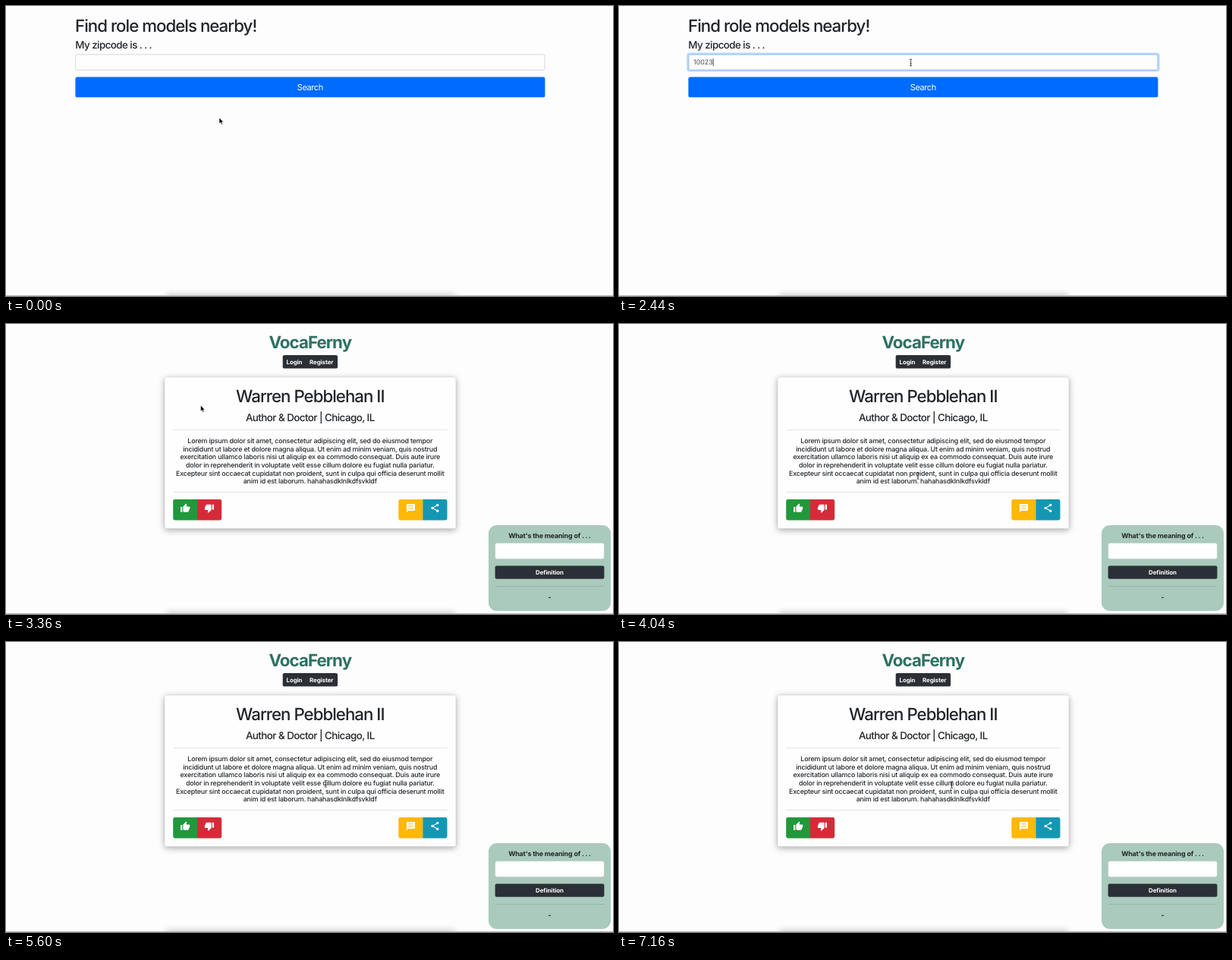
Write an HTML page that moves like this. It is 800x382 px and loops after 7.2 s.

```html
<!DOCTYPE html>
<html lang="en">
<head>
<meta charset="utf-8">
<title>Role model search</title>
<style>
  html, body { margin: 0; width: 100%; height: 100%; overflow: hidden; background: #fdfdfd; }
  #stage { display: block; position: absolute; left: 0; top: 0; }
  text { font-family: Inter, "Open Sans", sans-serif; fill: #212529; text-rendering: geometricPrecision; white-space: pre; }
  .h1 { font-size: 22.3px; font-weight: 500; letter-spacing: -.045em; }
  .h4 { font-size: 13.4px; font-weight: 500; letter-spacing: -.042em; }
  .brand { font-size: 22.3px; font-weight: 700; letter-spacing: -.042em; fill: #2d7062; }
  .go { font-size: 11.1px; letter-spacing: -.04em; fill: #fff; }
  .field { font-size: 8.9px; letter-spacing: -.01em; fill: #495057; }
  .row { font-size: 7.5px; font-weight: 500; fill: #fff; }
  .body { font-size: 8.9px; font-weight: 500; letter-spacing: -.02em; }
  .ask { font-size: 8.9px; font-weight: 700; letter-spacing: -.017em; }
  .small { font-size: 7.9px; font-weight: 700; letter-spacing: -.01em; fill: #fff; }
  .mid { text-anchor: middle; }
  .rule { stroke: #000; stroke-opacity: .1; }
  .dark { fill: #2b3036; }
  .card { filter: drop-shadow(0 2px 4px rgba(0, 0, 0, .34)); }
</style>
</head>
<body>
<svg id="stage" width="800" height="382" viewBox="0 0 800 382">
  <defs>
    <filter id="soft" x="-10%" y="-200%" width="120%" height="500%"><feGaussianBlur stdDeviation="4"/></filter>
    <path id="thumb" d="M1 21h4V9H1v12zm22-11c0-1.1-.9-2-2-2h-6.31l.95-4.57.03-.32c0-.41-.17-.79-.44-1.06L14.17 1 7.59 7.59C7.22 7.95 7 8.45 7 9v10c0 1.1.9 2 2 2h9c.83 0 1.54-.5 1.84-1.22l3.02-7.05c.09-.23.14-.47.14-.73v-2z"/>
  </defs>
  <rect width="800" height="382" fill="#fdfdfd"/>
  <rect x="211" y="380" width="381" height="12" fill="#000" opacity=".22" filter="url(#soft)"/>
  <rect y="381" width="800" height="1" fill="#b9b9b9"/>

  <g id="search">
    <text class="h1" x="91" y="34">Find role models nearby!</text>
    <text class="h4" x="91.3" y="56.2">My zipcode is . . .</text>
    <rect id="ring" x="90.2" y="62.4" width="621.4" height="23.2" rx="3" fill="none" stroke="#007bff" stroke-width="2"/>
    <rect x="91.7" y="63.9" width="618.4" height="20.4" rx="2" fill="#fefefe" stroke="#ced4da" stroke-width=".9"/>
    <rect id="edge" x="91.7" y="63.9" width="618.4" height="20.4" rx="2" fill="none" stroke="#80bdff" stroke-width=".9"/>
    <text class="field" id="typed" x="98.3" y="77.4"></text>
    <rect id="caret" y="69" width=".8" height="10" fill="#222"/>
    <rect id="button" x="91.4" y="93.6" width="619" height="26.7" rx="2.6"/>
    <text class="go mid" x="400.8" y="111">Search</text>
    <svg id="list" x="91.5" y="85" width="107" height="0" overflow="hidden">
      <rect width="107" height="140" fill="#222425"/>
      <g id="rows"></g>
    </svg>
  </g>

  <g id="profile">
    <text class="brand mid" x="400.8" y="31.8">VocaFerny</text>
    <rect class="dark" x="364.7" y="41" width="72.4" height="17.6" rx="2.2"/>
    <text class="small" x="369.5" y="52.8">Login</text>
    <text class="small" x="400" y="52.8">Register</text>

    <rect class="card" x="209" y="70" width="384" height="199.5" rx="2.2" fill="#fefefe"/>
    <rect x="209.2" y="70.2" width="383.6" height="199.1" rx="2.2" fill="none" stroke="#000" stroke-opacity=".13" stroke-width=".6"/>
    <text class="h1 mid" x="400.8" y="103.4">Warren Pebblehan II</text>
    <text class="h4 mid" x="400.8" y="127.7">Author &amp; Doctor | Chicago, IL</text>
    <path class="rule" d="M220 139.5H581.8M220 221.5H581.8"/>
    <g id="story"></g>

    <path fill="#21983c" d="M252 231H222.6a2.4 2.4 0 0 0-2.4 2.4V256a2.4 2.4 0 0 0 2.4 2.4H252z"/>
    <path fill="#d52b39" d="M252 231h29.8a2.4 2.4 0 0 1 2.4 2.4V256a2.4 2.4 0 0 1-2.4 2.4H252z"/>
    <path fill="#ffb806" d="M549.3 231h-29.6a2.4 2.4 0 0 0-2.4 2.4V256a2.4 2.4 0 0 0 2.4 2.4h29.6z"/>
    <path fill="#1497b2" d="M549.3 231h29.8a2.4 2.4 0 0 1 2.4 2.4V256a2.4 2.4 0 0 1-2.4 2.4h-29.8z"/>
    <g fill="#fff">
      <use href="#thumb" transform="translate(229.5 236) scale(.557)"/>
      <use href="#thumb" transform="translate(274.6 249.4) scale(-.557)"/>
      <g transform="translate(526.8 235.9) scale(.557)">
        <path d="M20 2H4c-1.1 0-2 .9-2 2v18l4-4h14c1.1 0 2-.9 2-2V4c0-1.1-.9-2-2-2z"/>
        <path fill="#ffb806" d="M6 5.5h12v1.6H6zM7 9h2v2H7zM11 9h2v2h-2zM15 9h2v2h-2zM6 13h12v1.4H6z"/>
      </g>
      <g transform="translate(558.7 235.7) scale(.557)">
        <path d="M18 5L6 12l12 7" fill="none" stroke="#fff" stroke-width="2"/>
        <circle cx="18" cy="5" r="3"/><circle cx="6" cy="12" r="3"/><circle cx="18" cy="19" r="3"/>
      </g>
    </g>

    <rect x="636" y="265" width="161" height="113" rx="11" fill="#a9cabc"/>
    <text class="ask mid" x="716.5" y="281.8">What's the meaning of . . .</text>
    <rect x="644.8" y="288.7" width="143.4" height="20.6" rx="2.2" fill="#fff" stroke="#ced4da" stroke-width=".5"/>
    <rect class="dark" x="644.6" y="318.4" width="143.8" height="17.4" rx="2"/>
    <text class="small mid" x="716.5" y="330">Definition</text>
    <path class="rule" d="M645 345.5H788"/>
    <text class="ask mid" x="716.5" y="363">-</text>
  </g>

  <g id="pointer">
    <path id="arrow" d="M0 0V8L1.8 6.4 3 9.2 4.4 8.6 3.2 5.9H5.6z" fill="#000" stroke="#fff" stroke-width=".6"/>
    <path id="hand" d="M1.5 4.6V.7Q2.1-.3 2.7.7V3l3 .7q1 .3.9 1.4L6 8.6H2.3L-.2 5.3q0-1 .9-.6z" fill="#fff" stroke="#000" stroke-width=".8" stroke-linejoin="round"/>
    <path id="beam" d="M-1.6-4.5Q0-4.5 0-3.4Q0-4.5 1.6-4.5M0-3.4V3.4M-1.6 4.5Q0 4.5 0 3.4Q0 4.5 1.6 4.5M-1 1.3H1" fill="none" stroke="#222" stroke-width=".8"/>
  </g>
</svg>
<script>
const LOOP = 7200, PAGE = 3280;
const $ = id => document.getElementById(id);

// time, x, y: the pointer eases between these stops
const path = [
  [0, 281, 147], [40, 281, 147], [520, 387, 74], [2400, 387, 74], [2920, 252, 103],
  [PAGE, 252, 104], [4040, 394, 200], [4480, 394, 200], [4760, 394.5, 185],
  [5280, 394.5, 185], [5840, 438.5, 188], [LOOP, 438.5, 188]
];
// time, typed text
const typing = [[0, ""], [1160, "1"], [1520, "10"], [1760, "100"], [1960, "1002"], [2240, "10023"]];
// time, list height, rows
const all = ["11419", "10010", "10023", "10019", "11201", "11375"];
const lists = [
  [0, 0, []], [600, 131, all], [1200, 91, all.slice(0, 4)], [1520, 72.5, all.slice(0, 4)],
  [1560, 71, all.slice(1, 4)], [2000, 31, ["10023"]], [2240, 0, []]
];
const story = [
  "Lorem ipsum dolor sit amet, consectetur adipiscing elit, sed do eiusmod tempor",
  "incididunt ut labore et dolore magna aliqua. Ut enim ad minim veniam, quis nostrud",
  "exercitation ullamco laboris nisi ut aliquip ex ea commodo consequat. Duis aute irure",
  "dolor in reprehenderit in voluptate velit esse cillum dolore eu fugiat nulla pariatur.",
  "Excepteur sint occaecat cupidatat non proident, sunt in culpa qui officia deserunt mollit",
  "anim id est laborum. hahahasdklnlkdfsvkldf"
];

const ramp = (t, from, span = 150) => Math.min(1, Math.max(0, (t - from) / span));
const latest = (steps, t) => steps.filter(s => s[0] <= t).pop();
const show = (id, on) => $(id).setAttribute("visibility", on ? "inherit" : "hidden");
const put = (id, name, value) => $(id).setAttribute(name, value);
const lines = (texts, cls, x, y, step) => texts.map((s, i) =>
  `<text class="${cls}" x="${x}" y="${y + i * step}">${s}</text>`).join("");

function place(t) {
  const i = Math.max(1, path.findIndex(p => p[0] > t));
  const [t0, x0, y0] = path[i - 1], [t1, x1, y1] = path[i];
  const u = (t - t0) / (t1 - t0), e = u * u * (3 - 2 * u);
  return [x0 + (x1 - x0) * e, y0 + (y1 - y0) * e];
}

function drawPointer(t) {
  const [x, y] = place(t), first = t < PAGE;
  const beam = first ? y < 88 : y > 148;
  const hand = first && !beam && y > 93 && y < 120;
  put("pointer", "transform", `translate(${x} ${y})`);
  put("pointer", "visibility", t >= 1160 && t < 1960 ? "hidden" : "visible");
  show("beam", beam);
  show("hand", hand);
  show("arrow", !beam && !hand);
}

let current;
function drawSearch(t) {
  const text = latest(typing, t)[1];
  const focus = ramp(t, 520) * (1 - ramp(t, 3020));
  const hover = Math.max(Math.min(ramp(t, 240), 1 - ramp(t, 355)), ramp(t, 2735));
  put("ring", "opacity", focus * .27);
  put("edge", "opacity", focus);
  put("button", "fill", `rgb(0 ${107 - 17 * hover} ${255 - 47 * hover})`);
  $("typed").textContent = text;
  put("caret", "x", 98.3 + (text ? $("typed").getComputedTextLength() + .2 : 0));
  show("caret", t >= 560 && t < 3020);

  const list = latest(lists, t);
  if (list !== current) {
    current = list;
    put("list", "height", list[1]);
    show("list", list[1] > 0);
    $("rows").innerHTML = lines(list[2], "row", 6.5, 17.6, 20);
  }
}

function draw(t) {
  const first = t < PAGE;
  put("search", "visibility", first ? "visible" : "hidden");
  put("profile", "visibility", first ? "hidden" : "visible");
  if (first) drawSearch(t);
  drawPointer(t);
}

$("story").innerHTML = lines(story, "body mid", 400.8, 157.1, 10.65);
const start = performance.now();
function tick() {
  draw((performance.now() - start) % LOOP);
  requestAnimationFrame(tick);
}
tick();
</script>
</body>
</html>
```
